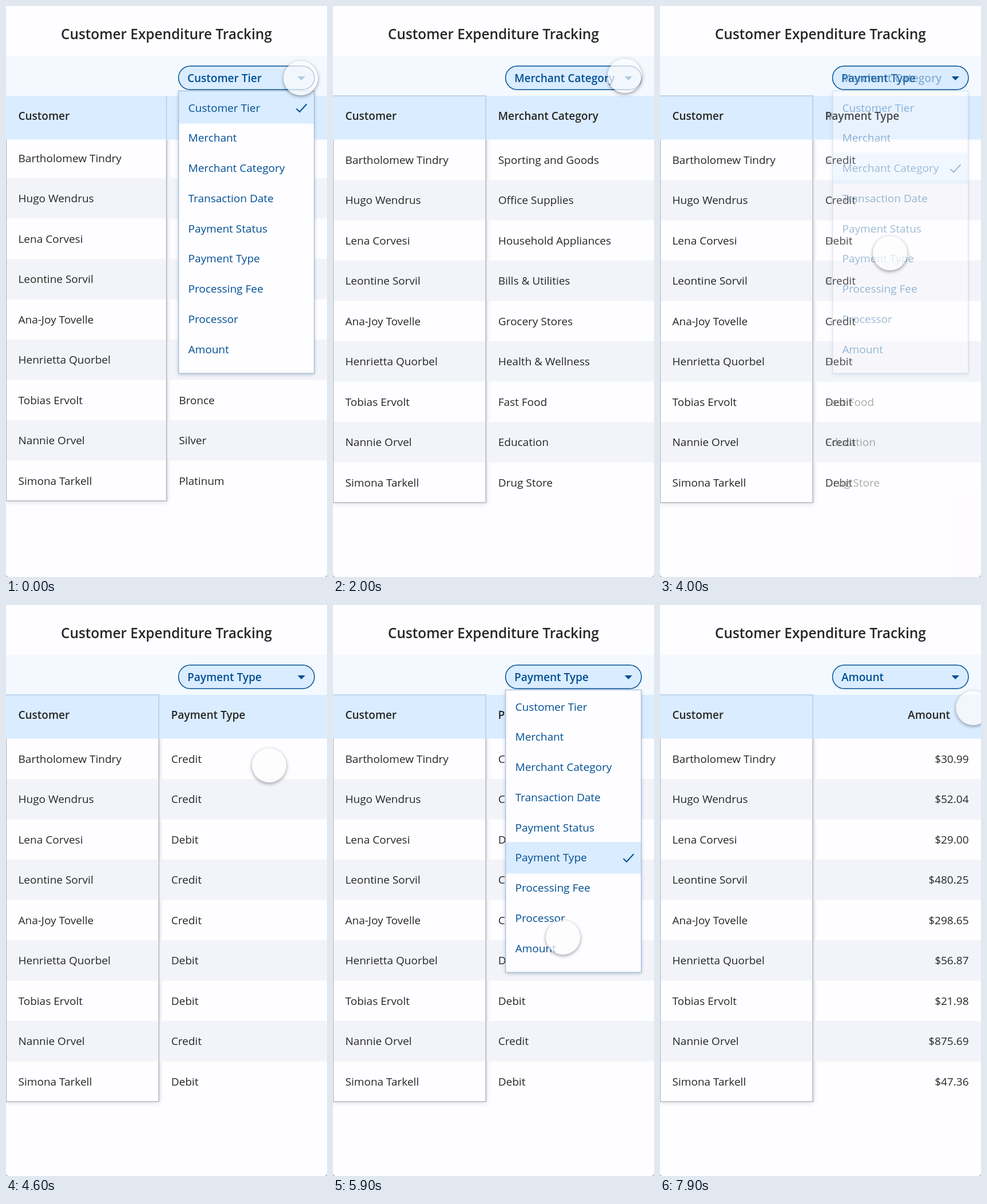
Recreate the animation shown at these times as an HTML page. Size 561 by 998 pixels, loop 8000 ms.

```html
<!DOCTYPE html>
<html lang="en">
<head>
<meta charset="utf-8">
<title>Customer Expenditure Tracking</title>
<style>
  html, body { margin: 0; width: 100%; height: 100%; overflow: hidden; background: #b9b9bb; }
  #stage { position: relative; width: 561px; height: 998px; overflow: hidden; background: #fefdff; border-radius: 0 0 6px 6px; }
  svg { position: absolute; left: 0; top: 0; }
  text { font: 400 19px "Open Sans", sans-serif; fill: #262626; white-space: pre; }
  .bold { font-weight: 600; }
  .title { font-size: 24.35px; }
  .blue { fill: #004f94; }
  .end { text-anchor: end; }
  .panel { fill: #fefdff; filter: drop-shadow(1px 2px 4px rgba(40, 50, 70, .16)); }
  .menu { filter: drop-shadow(0 2px 3px rgba(30, 60, 100, .3)); }
  .base, .content, .menu-in { animation: 8s linear infinite; }
  .base.s1 { animation-name: fade1; }
  .base.s2 { animation-name: fade2; }
  .base.s3, .content.s3 { animation-name: fade3; }
  .content.s0 { animation-name: show0; }
  .content.s1 { animation-name: show1; }
  .content.s2 { animation-name: show2; }
  .s1 .menu-in { animation-name: open1; }
  .s2 .menu-in { animation-name: open2; }
  @keyframes fade1 { 0%, 13.5% { opacity: 0 } 17.9%, 100% { opacity: 1 } }
  @keyframes fade2 { 0%, 46.4% { opacity: 0 } 50.8%, 100% { opacity: 1 } }
  @keyframes fade3 { 0%, 75.6% { opacity: 0 } 80%, 100% { opacity: 1 } }
  @keyframes show0 { 0%, 14.4% { opacity: 1 } 18.8%, 100% { opacity: 0 } }
  @keyframes show1 { 0%, 13.5% { opacity: 0 } 17.9%, 47.3% { opacity: 1 } 51.7%, 100% { opacity: 0 } }
  @keyframes show2 { 0%, 46.4% { opacity: 0 } 50.8%, 76.5% { opacity: 1 } 80.9%, 100% { opacity: 0 } }
  @keyframes open1 { 0%, 31.25% { opacity: 0 } 35%, 100% { opacity: 1 } }
  @keyframes open2 { 0%, 66.875% { opacity: 0 } 70.625%, 100% { opacity: 1 } }
  #touch {
    position: absolute; left: -30px; top: -30px; width: 60px; height: 60px; border-radius: 50%;
    background: rgba(252, 252, 254, .7); box-shadow: 0 2px 6px rgba(0, 0, 0, .4);
    animation: move 8s cubic-bezier(.37, 0, .63, 1) infinite;
  }
  @keyframes move {
    0%, 2.5% { transform: translate(515px, 126px) }
    12.5%, 15.625% { transform: translate(438px, 264px) }
    24.375%, 37.5% { transform: translate(510px, 122px) }
    46.875%, 52.5% { transform: translate(402px, 432px) }
    62.5%, 65.35% { transform: translate(517.5px, 129.5px) }
    73.125% { transform: translate(402px, 581px) }
    84.25% { transform: translate(402px, 581px); animation-timing-function: cubic-bezier(.373, 0, .646, .844) }
    100% { transform: translate(554.3px, 160.4px) }
  }
</style>
</head>
<body>
<div id="stage"></div>
<script>
const names = ["Bartholomew Tindry", "Hugo Wendrus", "Lena Corvesi", "Leontine Sorvil", "Ana-Joy Tovelle",
  "Henrietta Quorbel", "Tobias Ervolt", "Nannie Orvel", "Simona Tarkell"];
const fields = ["Customer Tier", "Merchant", "Merchant Category", "Transaction Date", "Payment Status",
  "Payment Type", "Processing Fee", "Processor", "Amount"];
const states = [
  { field: 0, split: 280.5, top: 230.5, menu: true,
    cells: ["", "", "", "", "", "", "Bronce", "Silver", "Platinum"] },
  { field: 2, split: 267, top: 233.5, menu: true,
    cells: ["Sporting and Goods", "Office Supplies", "Household Appliances", "Bills & Utilities",
      "Grocery Stores", "Health & Wellness", "Fast Food", "Education", "Drug Store"] },
  { field: 5, split: 267, top: 233.5, menu: true,
    cells: [..."CCDCCDDCD"].map(c => c === "C" ? "Credit" : "Debit") },
  { field: 8, split: 267, top: 233.5, right: true,
    cells: ["$30.99", "$52.04", "$29.00", "$480.25", "$298.65", "$56.87", "$21.98", "$875.69", "$47.36"] }
];
const ROW = 70.5, ITEM = 52.75;

const text = (x, y, s, cls = "") =>
  `<text x="${x}" y="${y}" class="${cls}">${s.replace("&", "&amp;")}</text>`;
const rect = (x, y, w, h, fill, more = "") =>
  `<rect x="${x}" y="${y}" width="${w}" height="${h}" fill="${fill}" ${more}/>`;
const line = (d, color, w = 1.4) => `<path d="${d}" fill="none" stroke="${color}" stroke-width="${w}"/>`;
const rowY = (top, i) => top + 42 + i * ROW;

// Opaque backdrop: stripes, frozen column and empty pill
function base({ split, top, menu }) {
  const bottom = top + 9 * ROW;
  let out = rect(0, 87, 561, 911, "#fefdff")
    + `<rect class="panel" x="0" y="157" width="${split}" height="${bottom - 157}"/>`
    + rect(0, 87, 561, 70, "#f3f9ff") + rect(0, 157, 561, 76.5, "#daecff");
  for (let i = 1; i < 9; i += 2) out += rect(0, top + i * ROW, 561, ROW, "#f2f4f9");
  out += rect(split, 234, 4, bottom - 234, "url(#edge)");
  out += line(`M.5 233.5V${bottom}H${split}V233.5`, "#b7b8bc");
  out += line(`M${split} 233.5V157${split < 270 ? "H0" : ""}`, "#b3cbe3");
  out += text(21.5, 199, "Customer", "bold");
  names.forEach((name, i) => out += text(21.5, rowY(top, i), name));
  return out + rect(301.5, 105, 237.5, 41.2, "#daecff", 'rx="20.6" stroke="#004f94" stroke-width="1.5"')
    + '<path d="M509.5 123h13.5l-6.75 7z" fill="#004f94"/>';
}

function content({ field, split, top, right, menu, cells }) {
  let out = text(317, 133, fields[field], "bold blue");
  if (field) out += text(right ? 507 : 288.5, 199, fields[field], right ? "bold end" : "bold");
  cells.forEach((cell, i) =>
    out += text(right ? 539.5 : split + 21.7, rowY(top, i), cell, right ? "end" : ""));
  return out + (menu ? dropdown(field) : "");
}

function dropdown(pick) {
  const y = 177.5 + pick * ITEM;
  const from = pick ? y - 27 : 149;
  return `<g class="menu-in"><g class="menu">${rect(301.7, 148.5, 237, 493.5, "#fefdff")}</g>`
    + rect(302, from, 236.5, y + 28 - from, "#daecff")
    + rect(301.7, 148.5, 237, 493.5, "none", 'stroke="#a3bdd6" stroke-width="1.2"')
    + fields.map((f, i) => text(318.5, 184.5 + i * ITEM, f, "blue")).join("")
    + line(`M507.5 ${y + 2}l5.5 5.5L525.5 ${y - 6}`, "#004f94", 2) + "</g>";
}

const layers = (cls, draw) => states.map((s, i) => `<g class="${cls} s${i}">${draw(s)}</g>`).join("");

document.getElementById("stage").innerHTML = `<svg width="561" height="998">
  <defs><linearGradient id="edge"><stop stop-color="#28324a" stop-opacity=".1"/><stop offset="1" stop-color="#28324a" stop-opacity="0"/></linearGradient></defs>
  ${text(96, 58, "Customer Expenditure Tracking", "bold title")}${layers("base", base)}${layers("content", content)}</svg><div id="touch"></div>`;
</script>
</body>
</html>
```
